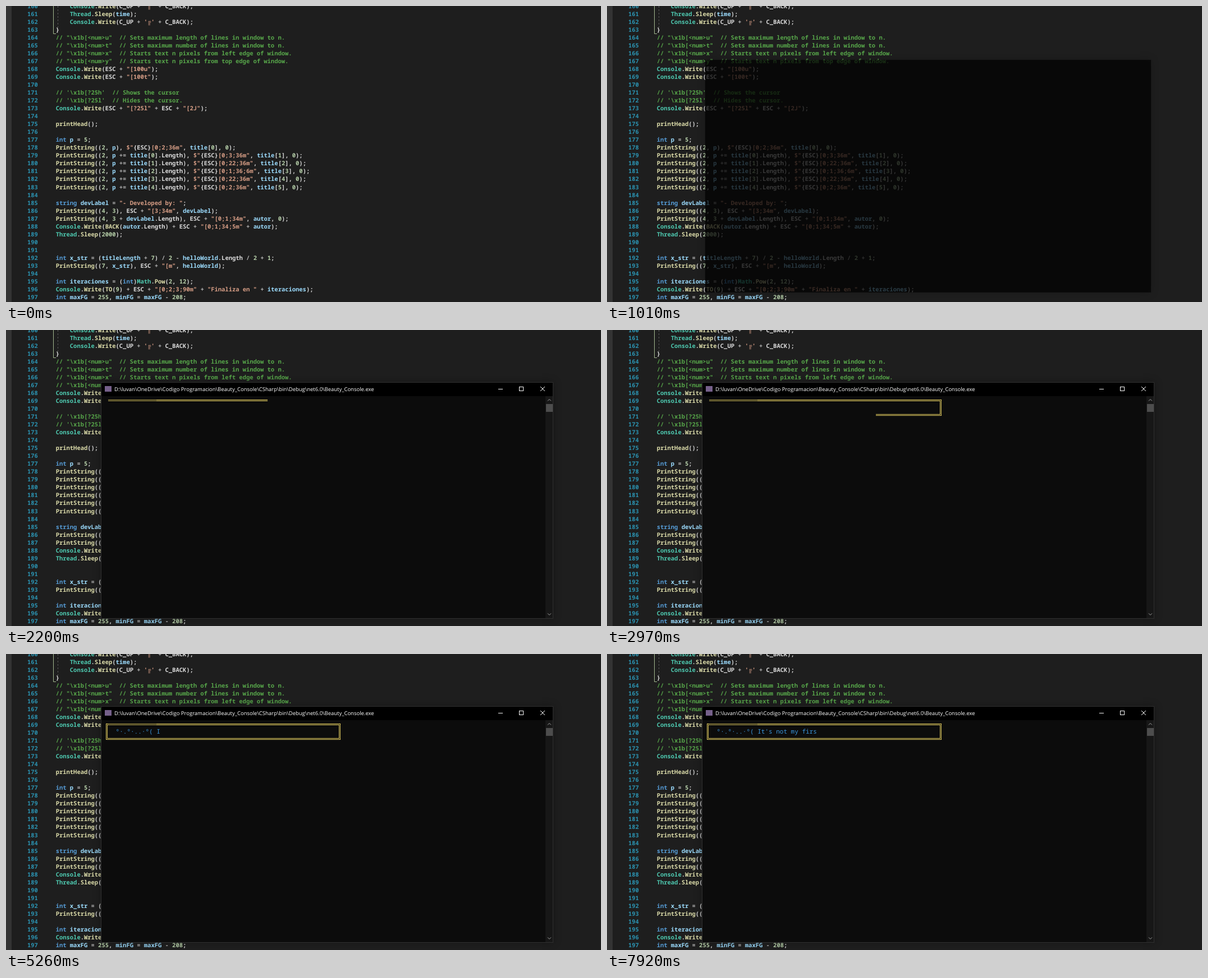
Write an HTML page with a canvas that moves like this. It is 1060 px wide and 528 px high and loops after 8 s.

```html
<!DOCTYPE html>
<html lang="en">
<head>
<meta charset="utf-8">
<title>Console greeting</title>
<style>
  html, body { margin: 0; width: 100%; height: 100%; overflow: hidden; background: #1e1e1e; }
  canvas { display: block; }
</style>
</head>
<body>
<canvas id="stage" width="1060" height="528"></canvas>
<script>
const ctx = document.getElementById('stage').getContext('2d');
const LOOP = 8000;
const MONO = '"Noto Sans Mono", "DejaVu Sans Mono", monospace';
const UI = '"Open Sans", "Noto Sans", sans-serif';

// ---------- editor ----------
const FIRST_LINE = 160, CODE_X = 88.7, CHAR_W = 6.285;
const lineY = row => 4.05 + row * 14.02;
const CODE = String.raw`
    Console.Write(C_UP + '║' + C_BACK);
    Thread.Sleep(time);
    Console.Write(C_UP + '╔' + C_BACK);
}
// "\x1b[<num>u"  // Sets maximum length of lines in window to n.
// "\x1b[<num>t"  // Sets maximum number of lines in window to n.
// "\x1b[<num>x"  // Starts text n pixels from left edge of window.
// "\x1b[<num>y"  // Starts text n pixels from top edge of window.
Console.Write(ESC + "[100u");
Console.Write(ESC + "[100t");

// '\x1b[?25h'  // Shows the cursor
// '\x1b[?25l'  // Hides the cursor.
Console.Write(ESC + "[?25l" + ESC + "[2J");

printHead();

int p = 5;
PrintString((2, p), $"{ESC}[0;2;36m", title[0], 0);
PrintString((2, p += title[0].Length), $"{ESC}[0;3;36m", title[1], 0);
PrintString((2, p += title[1].Length), $"{ESC}[0;22;36m", title[2], 0);
PrintString((2, p += title[2].Length), $"{ESC}[0;1;36;6m", title[3], 0);
PrintString((2, p += title[3].Length), $"{ESC}[0;22;36m", title[4], 0);
PrintString((2, p += title[4].Length), $"{ESC}[0;2;36m", title[5], 0);

string devLabel = "- Developed by: ";
PrintString((4, 3), ESC + "[3;34m", devLabel);
PrintString((4, 3 + devLabel.Length), ESC + "[0;1;34m", autor, 0);
Console.Write(BACK(autor.Length) + ESC + "[0;1;34;5m" + autor);
Thread.Sleep(2000);


int x_str = (titleLength + 7) / 2 - helloWorld.Length / 2 + 1;
PrintString((7, x_str), ESC + "[m", helloWorld);

int iteraciones = (int)Math.Pow(2, 12);
Console.Write(TO(9) + ESC + "[0;2;3;90m" + "Finaliza en " + iteraciones);
int maxFG = 255, minFG = maxFG - 208;`.slice(1).split('\n');

// One capture group per colour: comment, string, keyword, type, method,
// number, variable, operator, plain.
const TOKEN = /(\/\/.*)|(\$"|\[[\d;]+m"|"[^"]*"|'[^']*')|\b(int|string)\b|\b(Console|Thread|Math)\b|(\w+(?=\())|(\d+)|\b([a-z]\w*)|([+\-*\/=]+)|(\w+|\S)/g;
const COLORS = ['#57a64a', '#d69d85', '#569cd6', '#4ec9b0', '#dcdcaa',
                '#b5cea8', '#9cdcfe', '#b4b4b4', '#dcdcdc'];

const tokens = CODE.flatMap((line, row) => [...line.matchAll(TOKEN)].map(m => ({
  text: m[0],
  x: CODE_X + m.index * CHAR_W,
  y: lineY(row),
  color: COLORS[m.slice(1).findIndex(g => g !== undefined)]
})));

function rect(color, x, y, w, h) {
  ctx.fillStyle = color;
  ctx.fillRect(x, y, w, h);
}

function text(str, x, y, color) {
  ctx.fillStyle = color;
  ctx.fillText(str, x, y);
}

function path(color, ...points) {
  ctx.strokeStyle = color;
  ctx.beginPath();
  points.forEach(([x, y]) => ctx.lineTo(x, y));
  ctx.stroke();
}

function drawEditor() {
  rect('#1e1e1e', 0, 0, 1060, 528);
  rect('#333333', 0, 0, 10, 528);
  ctx.lineWidth = 1;
  path('#a3b88f', [84.5, 0], [84.5, 49.5], [89, 49.5]);
  ctx.setLineDash([3, 3]);
  path('#5a5a5a', [92.5, 0], [92.5, 38]);
  ctx.setLineDash([]);

  ctx.font = `600 10.475px ${MONO}`;
  CODE.forEach((_, row) => text(String(FIRST_LINE + row), 38, lineY(row), '#2b91af'));
  for (const k of tokens) text(k.text, k.x, k.y, k.color);
}

// ---------- console window ----------
const WIN = { x: 169, y: 93, w: 806, h: 421 };
const OPEN_AT = 900, OPEN_END = 1075, CHROME_AT = 1130;
const PATH = 'D:\\luvan\\OneDrive\\Codigo Programacion\\Beauty_Console\\CSharp\\bin\\Debug\\net6.0\\Beauty_Console.exe';

function drawFrame(t) {
  const left = Math.max(0, OPEN_END - t);
  const scale = 1 - left / 4400;
  const w = WIN.w * scale, h = WIN.h * scale;
  ctx.save();
  ctx.globalAlpha = 1 - left / 200;
  ctx.shadowColor = 'rgba(0,0,0,.3)';
  ctx.shadowBlur = 14;
  rect('#000', WIN.x + (WIN.w - w) / 2, WIN.y + (WIN.h - h) / 2, w, h);
  ctx.restore();
}

function drawChrome() {
  const { x, y, w, h } = WIN;
  rect('#0c0c0c', x, y + 25, w, h - 25);
  rect('#171717', 961, y + 25, 14, h - 25);
  rect('#4d4d4d', 962, 132, 12, 14);
  ctx.lineWidth = 1;
  ctx.strokeStyle = '#303030';
  ctx.strokeRect(x + .5, y + .5, w - 1, h);

  rect('#75608a', 176, 100, 12, 10);
  ctx.font = `9.47px ${UI}`;
  text(PATH, 193, 108.5, '#fff');

  path('#fff', [877, 105.5], [885, 105.5]);
  ctx.strokeRect(914.5, 101.5, 7, 7);
  path('#fff', [952, 101], [960, 109]);
  path('#fff', [960, 101], [952, 109]);
  path('#a0a0a0', [965, 126.5], [968, 123.5], [971, 126.5]);
  path('#a0a0a0', [965, 505.5], [968, 508.5], [971, 505.5]);
}

// ---------- console output ----------
const CELL_W = 6.6, ORIGIN = 169.2, LAST_COL = 64;
const ROWS = [118, 131, 145, 158];
const colX = c => Math.round(ORIGIN + c * CELL_W);

// Border cells in the order they are printed: clockwise, top-left corner last.
const cells = [];
for (let c = 2; c <= LAST_COL; c++) cells.push([c, 0]);
cells.push([LAST_COL, 1]);
for (let c = LAST_COL; c >= 1; c--) cells.push([c, 2]);
cells.push([1, 1], [1, 0]);

// [time, cells printed]
const PACE = [[1190, 13], [1289, 13], [1290, 14], [1670, 26], [1769, 26], [1770, 27],
              [2560, 58], [2580, 59], [2970, 82], [3370, 101], [3390, 102], [4150, 130]];

function printed(t) {
  if (t < PACE[0][0]) return 0;
  for (let i = 1; i < PACE.length; i++) {
    const [t0, n0] = PACE[i - 1], [t1, n1] = PACE[i];
    if (t < t1) return Math.floor(n0 + (n1 - n0) * (t - t0) / (t1 - t0));
  }
  return cells.length;
}

function drawBorder(count) {
  if (!count) return;
  ctx.save();
  ctx.beginPath();
  for (const [c, r] of cells.slice(0, count)) {
    ctx.rect(colX(c), ROWS[r], colX(c + 1) - colX(c), ROWS[r + 1] - ROWS[r]);
  }
  ctx.clip();
  ctx.lineWidth = 1;
  ctx.strokeStyle = '#e0ca5e';
  ctx.strokeRect(178.5, 124.5, 417, 28);
  ctx.strokeRect(180.5, 126.5, 413, 24);
  // the first batch of cells looks duller
  rect('rgba(12,12,12,.25)', colX(2), 123, colX(15) - colX(2), 4);
  ctx.restore();
}

const MESSAGE = "º·.º·..·º( It's not my firs";
const TYPED_AT = [4110, 4290, 4520, 4600, 4680, 4750, 4830, 4910, 4990, 5170, 5200, 5260, 5460,
                  5600, 5650, 5800, 5970, 6180, 6380, 6600, 6880, 6950, 7150, 7340, 7550, 7740, 7920];

function drawMessage(t) {
  ctx.font = `11px ${MONO}`;
  TYPED_AT.forEach((at, i) => {
    if (t >= at) text(MESSAGE[i], ORIGIN + (4 + i) * CELL_W, 142, '#3a96dd');
  });
}

function draw(t) {
  ctx.textRendering = 'geometricPrecision';
  drawEditor();
  if (t < OPEN_AT) return;
  drawFrame(t);
  if (t < CHROME_AT) return;
  drawChrome();
  drawBorder(printed(t));
  drawMessage(t);
}

const start = performance.now();
function tick() {
  draw((performance.now() - start) % LOOP);
  requestAnimationFrame(tick);
}
tick();
</script>
</body>
</html>
```
